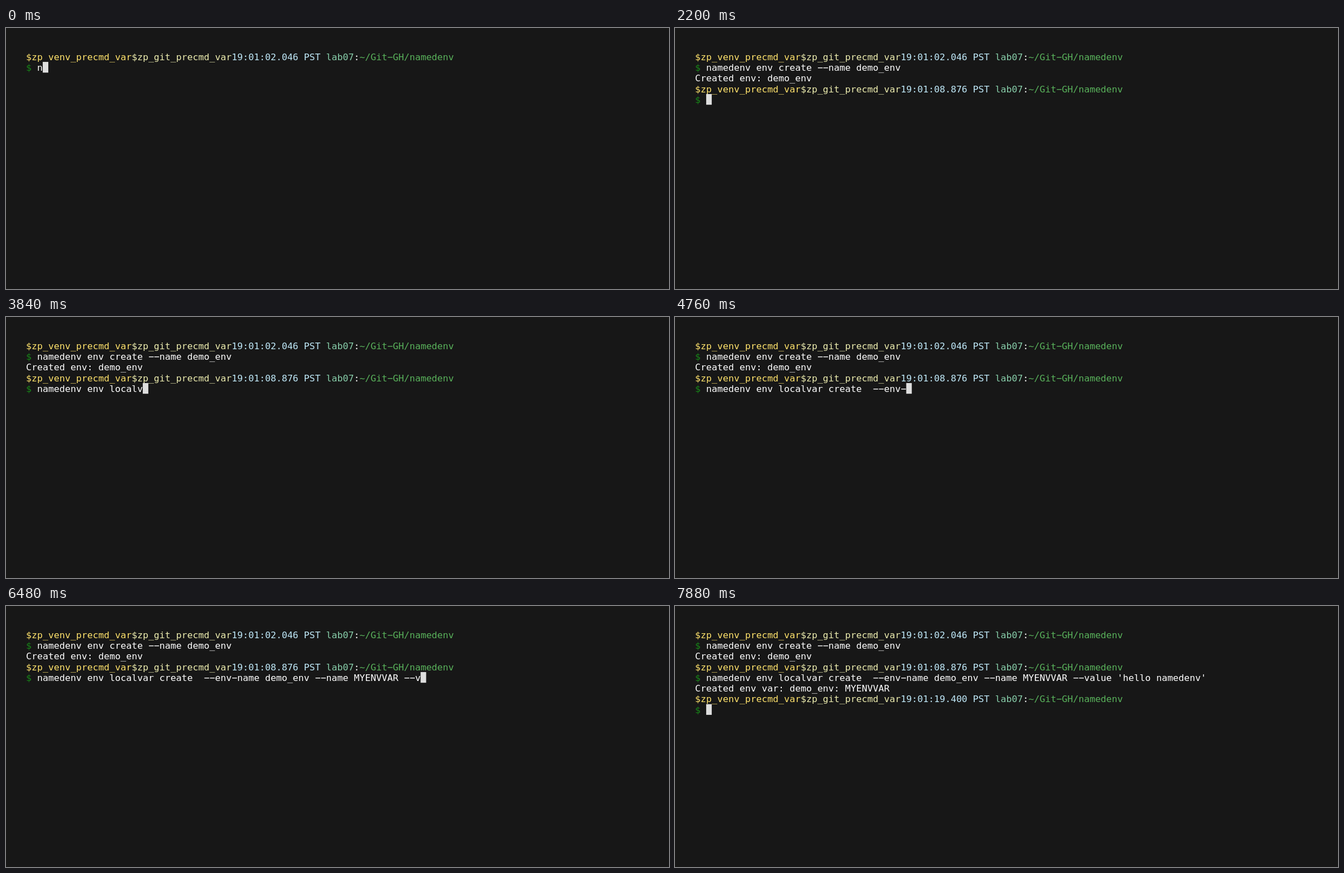
An HTML page with a canvas that plays this animation: 1192 px wide and 470 px high, repeating every 8000 ms.

```html
<!DOCTYPE html>
<html lang="en">
<head>
<meta charset="utf-8">
<title>Terminal session</title>
<style>
  html, body { margin: 0; width: 100%; height: 100%; overflow: hidden; background: #171717; }
  canvas { display: block; }
</style>
</head>
<body>
<canvas id="stage" width="1192" height="470"></canvas>
<script>
const ctx = document.getElementById('stage').getContext('2d');

const LOOP = 8000, TICK = 40;
const LEFT = 36.1, TOP = 41.8, CELL = 9.99, ROW = 19.28, ASCENT = 15.9;
const COLOR = {
  back: '#171717', text: '#ffffff', cursor: '#dedede',
  venv: '#ffe36c', git: '#eeeeb0', clock: '#c0e9f9',
  host: '#88ceaa', path: '#59b25b', dollar: '#188618'
};

// Typing pace: a few [ms, characters] points with a steady rate between them
const COMMANDS = [
  {
    text: 'namedenv env create --name demo_env',
    reply: 'Created env: demo_env',
    clock: '19:01:02.046',
    pace: [[0, 1.2], [1120, 22.4], [1920, 35.3]],
    enter: 2120, answer: 2160, done: 2200
  },
  {
    text: "namedenv env localvar create  --env-name demo_env --name MYENVVAR --value 'hello namedenv'",
    reply: 'Created env var: demo_env: MYENVVAR',
    clock: '19:01:08.876',
    pace: [[2840, 1.4], [5360, 47.3], [5760, 54], [6520, 70.8], [7640, 90.4]],
    enter: 7840, answer: 7880, done: 7880
  }
];
const LAST_CLOCK = '19:01:19.400';
const BLINK = { from: 2640, to: 2840 };

function typed({ text, pace }, t) {
  if (t < pace[0][0]) return '';
  const next = pace.findIndex(([time]) => time > t);
  if (next < 0) return text;
  const [t0, n0] = pace[next - 1], [t1, n1] = pace[next];
  return text.slice(0, Math.floor(n0 + (n1 - n0) * (t - t0) / (t1 - t0) + 1e-6));
}

// Draws text on the character grid and returns the next column
function put(text, row, col, color) {
  ctx.fillStyle = color;
  const y = Math.round(TOP + row * ROW + ASCENT);
  // The minus glyph gives the wide hyphen of the terminal font
  for (const ch of text.replace(/-/g, '\u2212')) {
    ctx.fillText(ch, LEFT + col * CELL, y);
    col++;
  }
  return col;
}

function prompt(row, clock) {
  const parts = [
    ['$zp_venv_precmd_var', COLOR.venv],
    ['$zp_git_precmd_var', COLOR.git],
    [clock + ' PST ', COLOR.clock],
    ['lab07', COLOR.host],
    [':', COLOR.text],
    ['~/Git-GH/namedenv', COLOR.path]
  ];
  let col = 0;
  for (const [text, color] of parts) col = put(text, row, col, color);
  return put('$ ', row + 1, 0, COLOR.dollar);
}

// Prints the session so far and returns the cursor cell
function session(t) {
  let row = 0;
  for (const cmd of COMMANDS) {
    let col = prompt(row++, cmd.clock);
    col = put(typed(cmd, t), row, col, COLOR.text);
    if (t < cmd.enter) return [row, col];
    row++;
    if (t < cmd.answer) return [row, 0];
    put(cmd.reply, row++, 0, COLOR.text);
    if (t < cmd.done) return [row, 0];
  }
  return [row + 1, prompt(row, LAST_CLOCK)];
}

function draw(t) {
  ctx.fillStyle = COLOR.back;
  ctx.fillRect(0, 0, 1192, 470);
  ctx.font = '16.6px Menlo, "DejaVu Sans Mono", monospace';

  const [row, col] = session(t);
  if (t >= BLINK.from && t < BLINK.to) return;
  ctx.fillStyle = COLOR.cursor;
  ctx.fillRect(LEFT + col * CELL, TOP + row * ROW, CELL, ROW);
}

const start = performance.now();
function loop() {
  const t = (performance.now() - start) % LOOP;
  draw(Math.floor(t / TICK) * TICK);
  requestAnimationFrame(loop);
}
loop();
</script>
</body>
</html>
```
